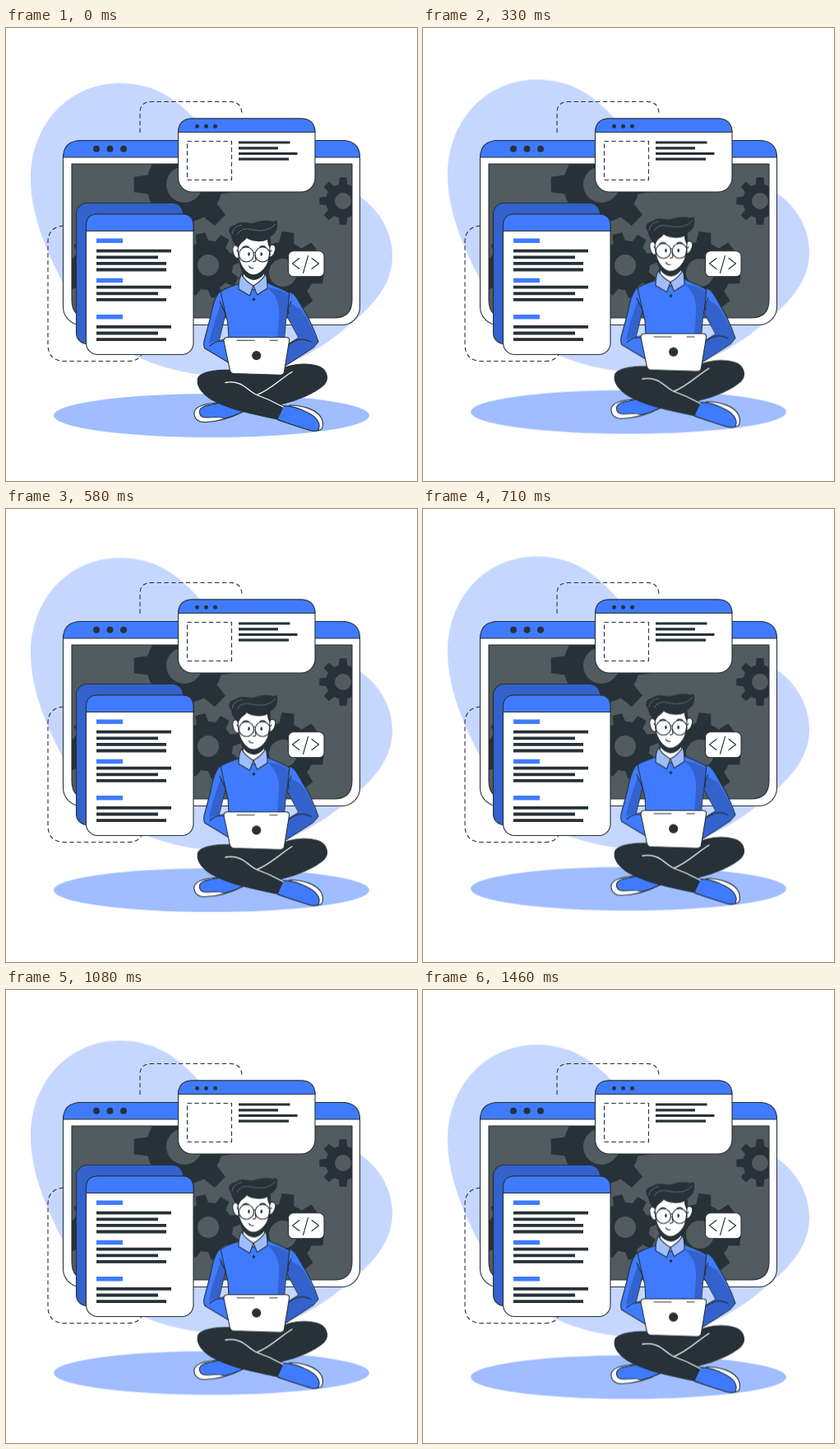
Animation of 500 by 550 pixels, one loop 1500 ms. Source, as an HTML page:

```html
<!DOCTYPE html>
<html lang="en">
<head>
<meta charset="utf-8">
<title>Developer at work</title>
<style>
  html, body { margin: 0; width: 100%; height: 100%; overflow: hidden; background: #fff; }
  svg { display: block; width: 100vw; height: 100vh; }
  .float { animation: float 1.5s linear infinite; }
  @keyframes float { 50% { transform: translateY(-10px); } }
  .blue { fill: #407bff; }
  .deep { fill: #3362cc; }
  .pale { fill: #9fbdff; }
  .white { fill: #fff; }
  .dark { fill: #263238; }
  .line { stroke: #263238; stroke-width: 1.1; stroke-linejoin: round; stroke-linecap: round; }
  .none { fill: none; }
  .dash { fill: none; stroke: #263238; stroke-width: 1.1; stroke-dasharray: 5.4 3.4; }
</style>
</head>
<body>
<svg viewBox="0 0 500 550">
  <defs>
    <clipPath id="screen"><path d="M80 165H421V330Q421 352 399 352H102Q80 352 80 330Z"/></clipPath>
  </defs>

  <g class="float">
    <path fill="#c6d7ff" d="M137 67C75 68 30 118 30 183C30 230 52 278 76 322C98 362 135 388 166 402C212 422 262 426 304 418C346 411 380 391 405 371C442 342 470 315 470 277C470 248 455 222 431 205C380 170 290 165 236 117C206 84 180 67 137 67Z"/>
    <ellipse class="pale" cx="250" cy="470.5" rx="192" ry="26.500"/>
  </g>

  <path class="dash" d="M163 127V103Q163 89.500 177 89.500H273Q287 89.500 287 105"/>
  <path class="dash" d="M70 240Q51 242 51 260V384Q51 404.500 72 404.500H150Q161 404 165 396"/>

  <!-- monitor -->
  <rect class="white line" x="69.500" y="136.500" width="361" height="224" rx="22"/>
  <path class="blue line" d="M69.500 157V158Q69.500 136.500 92 136.500H408Q430.500 136.500 430.500 157Z"/>
  <g class="dark"><circle cx="110" cy="146.700" r="4"/><circle cx="126.500" cy="146.700" r="4"/><circle cx="143" cy="146.700" r="4"/></g>
  <g clip-path="url(#screen)">
    <path fill="#515b60" d="M80 165H421V352H80Z"/>
    <g id="gears" class="dark"></g>
  </g>
  <path class="none line" d="M80 165H421V330Q421 352 399 352H102Q80 352 80 330Z"/>

  <!-- documents -->
  <rect class="deep line" x="85.500" y="212.500" width="130" height="171" rx="13"/>
  <rect class="white line" x="97.500" y="226" width="130.500" height="170.500" rx="14"/>
  <path class="blue line" d="M97.500 246.500V240Q97.500 226 111.500 226H214Q228 226 228 240V246.500Z"/>
  <path stroke="#407bff" stroke-width="5.500" d="M110 258.300h32M110 306.500h32M110 350.700h32"/>
  <path id="rows" stroke="#263238" stroke-width="3.800"/>

  <!-- popup -->
  <rect class="white line" x="209.500" y="110" width="166.500" height="89" rx="17"/>
  <path class="blue line" d="M209.500 126.500Q210 110 226.500 110H359Q375.500 110 376 126.500Z"/>
  <g class="dark"><circle cx="232.500" cy="119.300" r="2.500"/><circle cx="243.500" cy="119.300" r="2.500"/><circle cx="254.500" cy="119.300" r="2.500"/></g>
  <rect class="dash" x="220.500" y="137.500" width="54" height="47"/>
  <path stroke="#263238" stroke-width="3.200" d="M283 139h62.500M283 145.900h48M283 152.500h71.500M283 159.200h61"/>

  <!-- code tag -->
  <rect class="white line" x="343.500" y="270.800" width="43.500" height="31" rx="6"/>
  <path class="none line" d="M357 279.500L348.500 286L357 292.500M367.500 276.500L361.500 297.500M372 279.500L380.500 286L372 292.500"/>

  <!-- developer -->
  <g class="float">
    <!-- torso -->
    <path class="blue line" d="M287 309C278 313 268 315 261 320C260 330 268 345 270 360L272 395H337L341 350L350 326C340 317 328 315 316 308Z"/>
    <path class="deep" d="M317 315C328 322 333 335 332 350L330 378H338L341 350L347 326C338 319 328 316 317 315Z"/>

    <!-- arms -->
    <path class="blue line" d="M261 319.500C255 323 252 334 249 350L241 380Q240 386 242 389L272 407V380Q264 377 259 380L267 347Z"/>
    <path class="deep" d="M262 333C256 350 250 366 247 383Q252 380 259 380L266.500 347Z"/>
    <path class="none line" d="M260 332L267 347M248 386C253 381 260 379 268 381"/>
    <path class="blue line" d="M345 320C353 323 356 332 362 342C370 355 376 369 380 381L374 388L337 412L340 386L356 376L342 350Z"/>
    <path class="deep" d="M346 334L342.500 350L356 376L340.500 386L338 410L373 388L379.300 381C374 366 366 352 359 342Z"/>
    <path class="none line" d="M347 332Q342 341 344 347M341 387C350 379 360 375 371 381"/>

    <!-- neck, collar -->
    <path class="white line" d="M289 291L288 304L301 318L315 303L314 290Z"/>
    <path class="pale line" d="M286.500 299C283 305 283 311 283 317L296.500 325L301 313C294 309 289 304 286.500 299Z"/>
    <path class="pale line" d="M316 298.500C318 305 318 311 318 316L305.500 324L301 313C308 309 313 304 316 298.500Z"/>
    <circle class="dark" cx="301.500" cy="329.500" r="1.800"/>

    <!-- head -->
    <path class="white line" d="M283 265C278 262 275 265 276 271C277 277 280 281 284 279ZM320 265C325 261 329 264 327.500 270C326 276 323 279 319 278Z"/>
    <path class="white line" d="M282 259C282 273 283 286 288 295Q295 304 302 304Q312 302 317 291C321 280 321.500 268 321 253L302 245Z"/>
    <path class="dark" d="M284 280C286 288 290 294 296 298Q302 301 308 297C314 293 318 287 320 279C320 291 315 300 308 304Q301 308 294 303.500C287 299 284 290 284 280Z"/>
    <path class="dark" d="M279 264C276 259 274 256 274 252C269 247 271 240 279 239C284 234 292 236 299 237C307 235 316 232 325 235Q331 232 330 238C331 246 327 250 321 254Q323 260 321.500 267Q318 264 318 257C310 261 298 259 293 255C289 260 285 260 283 267Z"/>
    <path fill="none" stroke="#8c969b" stroke-width=".55" d="M275 250Q276 241 287 239M281 251Q286 241 300 245Q318 249 328 238"/>
    <g class="none line">
      <circle cx="292.500" cy="275" r="9"/><circle cx="312.200" cy="275" r="9"/>
      <path d="M301 273Q302 271.500 303.500 273M283 272L281 270M321 272L323 270M303 276L304 282Q303 284 300.500 283.500M295.500 289Q297 292.500 301 291.500"/>
      <path stroke-width="1.600" d="M288 266.500Q291 264 295 266M309 266Q313 263.500 316 266.500"/>
    </g>
    <ellipse class="dark" cx="295.500" cy="274.500" rx="1.300" ry="2.200"/>
    <ellipse class="dark" cx="310.700" cy="274.500" rx="1.300" ry="2.200"/>

    <!-- shoes -->
    <path class="white line" d="M256 455C244 456 231 459 229 466C228 474 234 479 242 478.500C257 478 271 475 288 466Z"/>
    <path class="blue line" d="M260 455C249 458 237 458 235.500 465C235 471 239 473.500 246 473C255 472 260 472 266 474Q278 471 288 466L277 459Z"/>
    <path class="white line" d="M345 458C361 458 378 463 384 474Q387 482 384 487Q379 490 370 488.500L331 476Z"/>
    <path class="blue line" d="M335 459C348 458 360 463 369 468C380 474 384 483 379 488.800Q375 489.500 370 488.500C355 484 342 480 330 475Z"/>

    <!-- legs -->
    <path class="dark line" d="M274 415C258 415 239 417 234 424C230 434 239 444 250 451C273 464 303 469 330 475L337 460L334 457C355 452 376 443 387 433C394 425 390 413 378 410C362 406 346 409 337 413Z"/>
    <path fill="none" stroke="#fff" stroke-width="1.300" stroke-linecap="round" d="M267 430.500C288 427 293 440 305 445.500Q321 451 337 460M348 417.500C335 425 321 440 305 445.500"/>

    <!-- laptop -->
    <path class="white line" d="M269 375.500H341Q345.500 376 344.500 380L338.500 417Q338 421.500 333 421.300L277 419.500Q273 419 272.300 415L265 380Q264.500 376 269 375.500Z"/>
    <path class="none line" d="M281 379.300H302M321 379.300H330"/>
    <circle class="dark" cx="304.700" cy="397.600" r="5.600"/>
  </g>
</svg>
<script>
  const TAU = Math.PI * 2;

  // Eight-toothed wheel with a round hole
  function gear(x, y, root, tip, hole, turn) {
    const at = (r, a) => `${(x + r * Math.cos(a)).toFixed(1)} ${(y + r * Math.sin(a)).toFixed(1)}`;
    let d = '';
    for (let i = 0; i < 8; i++) {
      const a = turn + i * TAU / 8;
      d += (i ? `A${root} ${root} 0 0 1 ` : 'M') + at(root, a - .25);
      d += `L${at(tip, a - .15)}L${at(tip, a + .15)}L${at(root, a + .25)}`;
    }
    d += `A${root} ${root} 0 0 1 ${at(root, turn - .25)}Z`;
    d += `M${x - hole} ${y}a${hole} ${hole} 0 1 0 ${2 * hole} 0a${hole} ${hole} 0 1 0 ${-2 * hole} 0Z`;
    return `<path fill-rule="evenodd" d="${d}"/>`;
  }

  document.getElementById('gears').innerHTML =
    gear(217, 190, 46, 62, 22, 0) +
    gear(246, 288, 30, 40, 13, .54) +
    gear(337, 297, 37, 50, 17, .12) +
    gear(410, 210, 21, 29, 10, 0) +
    gear(108, 292, 29, 38, 12, .2);

  const row = (y, ends) => ends.map((x, i) => `M110 ${y + i * 7.6}H${x}`).join('');
  document.getElementById('rows').setAttribute('d',
    row(270.7, [201, 185, 195, 195]) + row(314.7, [201, 185, 195]) + row(362.9, [201, 185, 195]));
</script>
</body>
</html>
```
